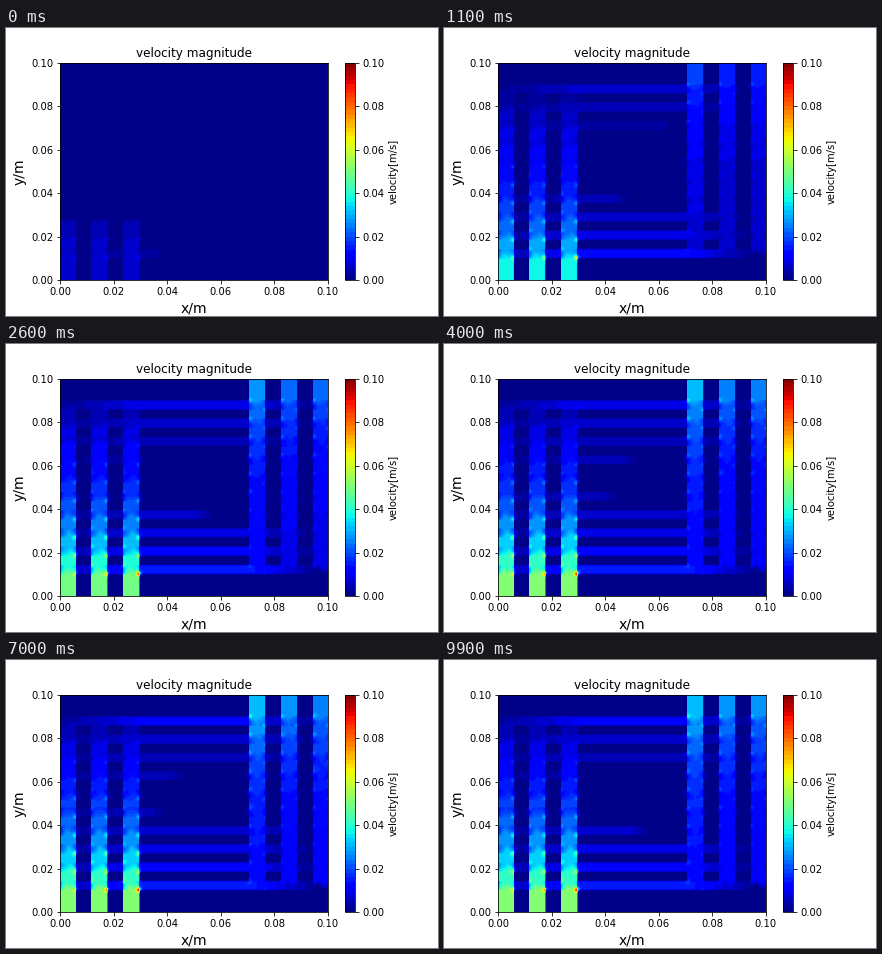
These frames come from a looping animation (432 px wide and 288 px high, 10000 ms). A matplotlib script:

```python
import numpy as np
import matplotlib.pyplot as plt
from matplotlib.animation import FuncAnimation
from matplotlib.colors import ListedColormap

FRAMES, INTERVAL = 100, 100
BANDS, VMAX = 50, 0.1
LEFT = [(54, 70), (85, 101.5), (117, 133.5)]
RIGHT = [(243, 259.5), (275, 291.5), (307, 323)]
PITCH, BASE, TOP = 18.2, 230.5, 57
ROW = np.arange(10)
ROW_Y = 225.6 - PITCH * ROW

X, Y = np.meshgrid(54.5 + np.arange(268), 35.5 + np.arange(217))
HEIGHT = (BASE - Y) / PITCH
ALONG = (X - 133.5) / (243 - 133.5)
BARS = [np.clip(2 * (1 - ((Y - y) / 5.2) ** 2), 0, 1) for y in ROW_Y]
JUNCTION = np.sum(BARS, axis=0)


def box(a, b):
    return np.clip(np.minimum(X - a, b - X) + 0.5, 0, 1)


def steps(d):
    """Staircase that rises over the first half of each pitch."""
    d = np.clip(d, 0, 10)
    f = np.clip(2 * (d % 1), 0, 1)
    return np.floor(d) + f * f * (3 - 2 * f)


def rise(k):
    """Share of the inlet speed left after k side channels."""
    return np.exp(-0.21 * k) * np.sqrt(np.clip((10 - k) / 2.5, 0, 1))


def collect(m):
    """Share of the outlet speed, m side channels below the top."""
    return (0.38 + 0.62 * np.exp(-0.32 * m)) * np.clip(10 - m, 0, 1)


def spot(x, y, r=1.6):
    return np.exp(-((X - x) ** 2 + (Y - y) ** 2) / (2 * r * r))


def column(a, b, share, d, gain):
    """One vertical duct: stepped flow, dented and spilling at junctions."""
    u = (X - a) / (b - a) - 0.5
    k = steps(d - 0.25 * u + 0.08 * np.sin(9 * u + 1.7 * d) * (d > 0))
    dent = 1 - 0.3 * JUNCTION * np.clip(2 * np.abs(u), 0, 1) ** 2
    gap = np.maximum(a - X, X - b)
    spill = 0.3 * JUNCTION * np.exp(-np.maximum(gap, 0) / 3) * (gap > 0)
    return gain * share(k) * np.maximum(box(a, b) * dent, spill)


def build_left():
    flow, hot = np.zeros_like(X), np.zeros_like(X)
    for j, (a, b) in enumerate(LEFT):
        flow = np.maximum(flow, column(a, b, rise, HEIGHT, 1))
        for i, y in enumerate(ROW_Y):
            gain = 0.35 + 0.25 * j if i == 0 else 0.5
            hot += gain * rise(i) * spot(b - 1, y + 4)
            hot += 0.25 * (j > 0) * rise(i) * spot(a + 1, y - 4, 1.4)
    return flow, hot


def build_right():
    flow, hot = np.zeros_like(X), np.zeros_like(X)
    for (a, b), gain in zip(RIGHT, (1, 0.84, 0.82)):
        flow = np.maximum(flow, column(a, b, collect, (Y - TOP) / PITCH, gain))
        for i, y in enumerate(ROW_Y):
            q = gain * collect(9 - i)
            hot += 0.4 * q * spot(a + 1, y - 4)
            hot += 0.25 * q * spot(b - 1, y + 4, 1.4)
    return flow, hot


left, left_hot = build_left()
right, right_hot = build_right()
# Cross flow weakens from duct to duct on either side.
thin = np.interp(X, [54, 133, 243, 318], [0.2, 1, 1, 0])


def cross_flow(n):
    """Horizontal channels open from both ends of the stack inward."""
    low = 0.0155 * np.exp(-0.33 * ROW) * (1 - np.exp(-(n + 1) / 8))
    high = 0.0095 * np.exp(-0.4 * (9 - ROW)) * (1 - np.exp(-n / 12))
    depth = (3.1 - 2.8 * np.exp(-(n - 1) / 4)
             + 1.4 * np.exp(-((n - 55) / 14) ** 2))
    reach = depth - np.minimum(0.8 * ROW, 9 - ROW)
    v = np.zeros_like(X)
    for bar, speed, r in zip(BARS, low + high, reach):
        tip = 1 if r > 1 else np.clip(5 * (r - ALONG), 0, 1) * (r > 0)
        v = np.maximum(v, speed * bar * tip * thin)
    return v


def field(n):
    inlet = 0.0515 * (1 - np.exp(-n / 10)) + 0.004 * np.exp(-n / 3)
    outlet = 0.0318 * (1 - np.exp(-n / 14)) * np.clip((n - 1) / 3, 0, 1)
    front = np.clip(2.5 * (2.3 + 2 * (n - 1) - HEIGHT), 0, 1)
    ducts = np.maximum(inlet * left * front, outlet * right)
    return (np.maximum(ducts, cross_flow(n))
            + inlet * left_hot + outlet * right_hot)


fig, ax = plt.subplots(figsize=(6, 4), dpi=72)
fig.subplots_adjust(left=0.125, right=0.9, bottom=0.125, top=0.88)
cmap = ListedColormap(plt.get_cmap("jet")((np.arange(BANDS) + 0.5) / BANDS))
im = ax.imshow(field(1), cmap=cmap, vmin=0, vmax=VMAX, aspect="auto",
               extent=(0, 0.1, 0, 0.1), interpolation="bilinear",
               interpolation_stage="data")
ticks = np.linspace(0, VMAX, 6)
bar = fig.colorbar(im, ax=ax, ticks=ticks, format="%.2f")
bar.set_label("velocity[m/s]")
ax.set_title("velocity magnitude")
ax.set_xlabel("x/m", fontsize=14)
ax.set_ylabel("y/m", fontsize=14)
ax.set_xticks(ticks)
ax.set_yticks(ticks)


def update(i):
    im.set_data(field(i + 1))
    return [im]


anim = FuncAnimation(fig, update, frames=FRAMES, interval=INTERVAL,
                     repeat=True, repeat_delay=0)
plt.show()
```
